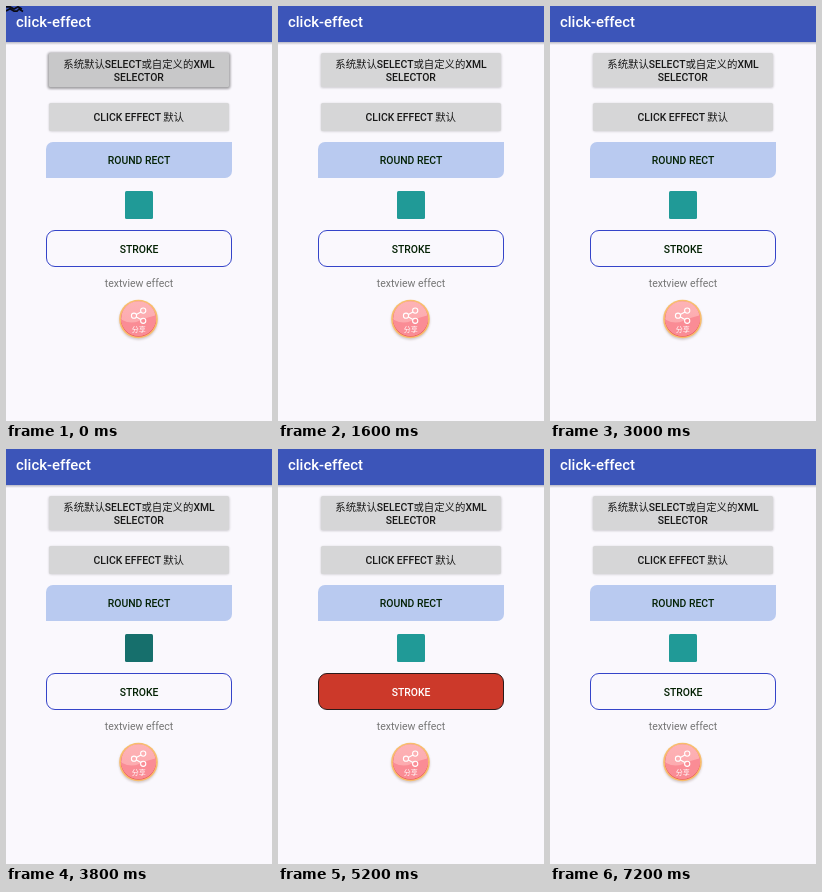
An HTML page that plays this animation: 266x415 px, repeating every 8000 ms.

```html
<!DOCTYPE html>
<html lang="zh">
<head>
<meta charset="utf-8">
<title>click-effect</title>
<style>
html, body { margin: 0; width: 100%; height: 100%; overflow: hidden; background: #faf8fd; }
svg { display: block; width: 266px; height: 415px; }
text { font-family: Roboto, "Noto Sans CJK SC", "Noto Sans CJK", sans-serif; }
.label { font-size: 10.4px; font-weight: 500; text-anchor: middle; fill: #181818; }
.label tspan { font-weight: 400; }
</style>
</head>
<body>
<svg viewBox="0 0 266 415">
  <defs>
    <linearGradient id="drop" x2="0" y2="1">
      <stop stop-color="#b9b9c4"/>
      <stop offset="1" stop-color="#faf8fd"/>
    </linearGradient>
    <linearGradient id="pink" x2="0" y2="1">
      <stop stop-color="#fdb3b6"/>
      <stop offset="1" stop-color="#fca5aa"/>
    </linearGradient>
    <filter id="soft" x="-10%" y="-30%" width="120%" height="160%">
      <feGaussianBlur stdDeviation="1"/>
    </filter>
    <clipPath id="disc"><circle cx="132.5" cy="312.5" r="17.3"/></clipPath>
  </defs>

  <rect width="266" height="415" fill="#faf8fd"/>
  <rect y="36" width="266" height="3" fill="url(#drop)"/>
  <rect width="266" height="36" fill="#3c55b9"/>
  <text x="10" y="21" font-size="14.9" font-weight="500" fill="#fff">click-effect</text>
  <g id="scrap" fill="none" stroke="#0b0b14" stroke-width="1.7">
    <path d="M0 .8H4L8 3L12 .8L16 3M0 5L4 2.8L8 5.2H11L13 3L17 5.5"/>
  </g>

  <rect id="shade1" x="42.5" y="47.5" width="181" height="34.5" rx="2" filter="url(#soft)"/>
  <rect id="face1" x="43" y="47" width="180" height="34" rx="1.5"/>
  <text class="label" x="133" y="62"><tspan>系统默认</tspan>SELECT<tspan>或自定义的</tspan>XML</text>
  <text class="label" x="132.8" y="74.5">SELECTOR</text>

  <rect id="shade2" x="43" y="97.5" width="180" height="28" rx="2" filter="url(#soft)"/>
  <rect x="43" y="97" width="180" height="28" rx="1.5" fill="#d6d6d7"/>
  <text class="label" id="text2" x="132.8" y="114.6">CLICK EFFECT <tspan>默认</tspan></text>

  <path id="round" d="M40 172V143a7 7 0 0 1 7-7H226V165a7 7 0 0 1-7 7Z"/>
  <text class="label" id="roundText" x="133" y="158">ROUND RECT</text>

  <rect id="icon" x="119" y="185" width="28" height="28" rx="1.5"/>

  <rect id="stroke" x="40.5" y="224.5" width="185" height="36" rx="8.5"/>
  <text class="label" id="strokeText" x="133" y="246.7">STROKE</text>

  <text id="view" x="133" y="281" font-size="10.5" text-anchor="middle">textview effect</text>

  <circle cx="132.5" cy="314.5" r="19.3" fill="#b9a9a5" opacity=".6" filter="url(#soft)"/>
  <circle cx="132.5" cy="313" r="19.3" fill="#f8bd6c"/>
  <circle cx="132.5" cy="313.2" r="17.6" fill="#ec5f66"/>
  <circle cx="132.5" cy="312.5" r="17.3" fill="url(#pink)"/>
  <path clip-path="url(#disc)" fill="#fa8c95" d="M114 313Q124 319 133 315T151 309V331H114Z"/>
  <g fill="none" stroke="#fff" stroke-width="1.1">
    <path d="M130.4 308.4L134.9 305.9M130.4 311L134.9 313.5"/>
    <circle cx="128" cy="309.7" r="2.6"/>
    <circle cx="137.2" cy="304.6" r="2.6"/>
    <circle cx="137.2" cy="314.8" r="2.6"/>
  </g>
  <text x="132.7" y="326" font-size="7" text-anchor="middle" fill="#fff">分享</text>
</svg>
<script>
const LOOP = 8000;
const RED = '#cc392a';
const INK = '#032103';
const $ = id => document.getElementById(id);
const set = (id, attrs) => {
  for (const [name, value] of Object.entries(attrs)) $(id).setAttribute(name, value);
};
const fill = (id, color) => { $(id).style.fill = color; };

function draw(t) {
  const held = (from, to) => t >= from && t < to;

  // The first button is released in five discrete steps.
  const step = Math.max(0, Math.min(5, Math.floor(t / 100) - 1));
  const press = 1 - step / 5;
  const gray = Math.round(214 - 14 * press);
  fill('face1', `rgb(${gray},${gray},${gray + 1})`);
  set('shade1', { opacity: 0.18 + 0.17 * press, 'stroke-width': 2 * press, stroke: '#000' });
  set('scrap', { visibility: t < 1000 ? 'visible' : 'hidden' });

  const click = held(1100, 1600);
  set('shade2', { opacity: click ? 0.35 : 0.18 });
  fill('text2', click ? RED : '#181818');

  const round = held(2400, 3000);
  fill('round', round ? RED : '#b9caf0');
  fill('roundText', round ? '#fff' : INK);

  fill('icon', held(3800, 4400) ? '#166f6c' : '#209a97');

  const stroke = held(5200, 6000);
  fill('stroke', stroke ? RED : '#faf8fd');
  set('stroke', { stroke: stroke ? '#2a1a1a' : '#3544c9' });
  fill('strokeText', stroke ? '#fff' : INK);

  fill('view', held(6600, 7200) ? RED : '#757575');
}

const start = performance.now();
function tick() {
  draw((performance.now() - start) % LOOP);
  requestAnimationFrame(tick);
}
tick();
</script>
</body>
</html>
```
